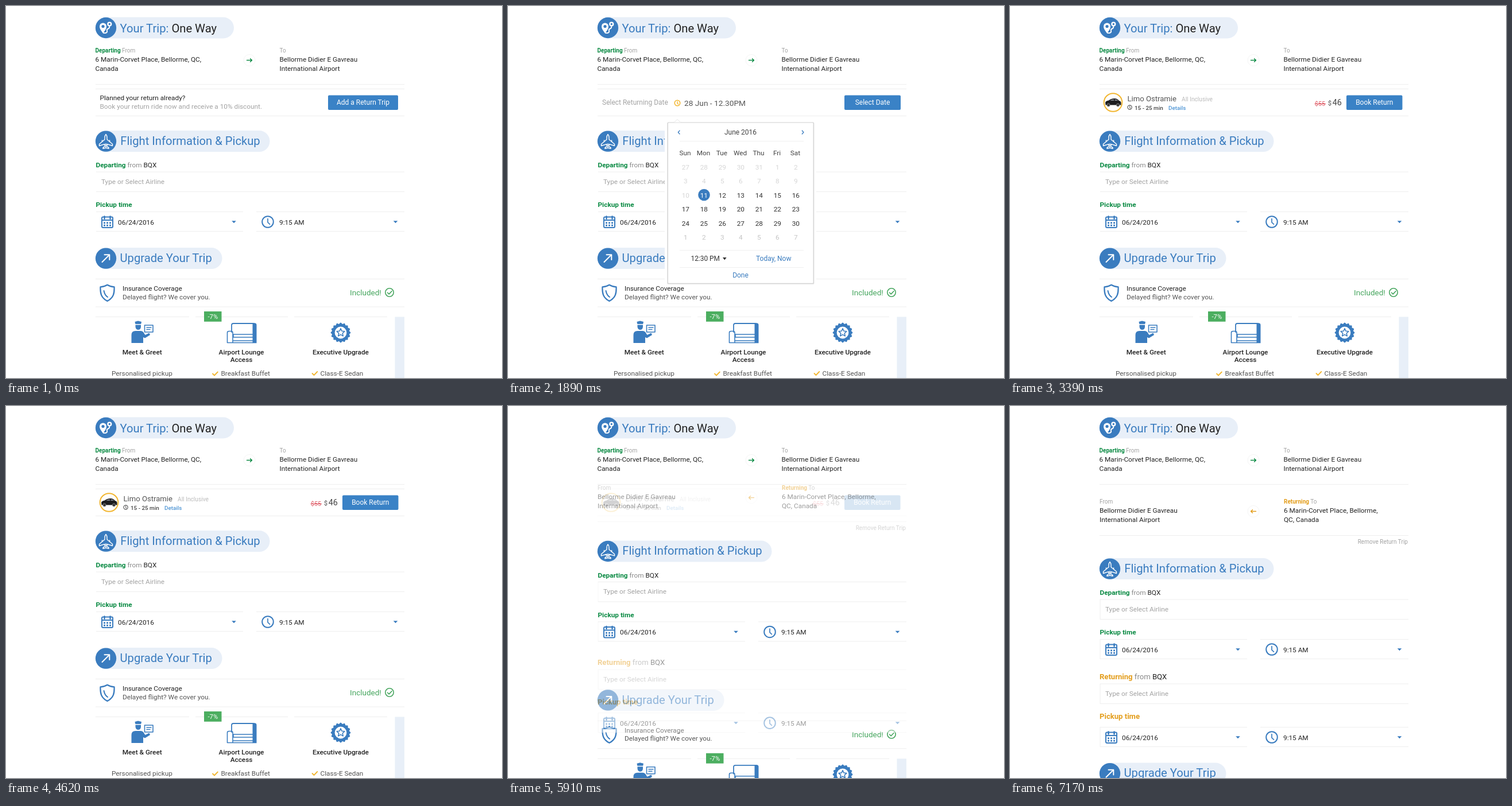
An HTML page for the animation above (7200 ms loop, 864x648 px).

```html
<!DOCTYPE html>
<html lang="en">
<head>
<meta charset="utf-8">
<title>Trip booking</title>
<style>
html, body { margin: 0; width: 100%; height: 100%; overflow: hidden; background: #fff; }
svg { display: block; width: 864px; height: 648px; }
text { font-family: Roboto, Arial, sans-serif; white-space: pre; }
</style>
</head>
<body>
<svg id="stage" viewBox="0 0 864 648" xmlns="http://www.w3.org/2000/svg"></svg>
<script>
const BLUE = '#3a7cbf', DARK = '#222', GRAY = '#a3a3a3', GREEN = '#0a8a43',
      ORANGE = '#e39d1b', GOLD = '#f2b630', RULE = '#eee', PILL = '#e8eff8';

const text = (x, y, s, fill = DARK, size = 11.8, more = '') =>
  `<text x="${x}" y="${y}" fill="${fill}" font-size="${size}" ${more}>${s}</text>`;
const mid = 'text-anchor="middle" ', bold = 'font-weight="700"', medium = 'font-weight="500"';
const span = (s, fill, more = '') => `<tspan fill="${fill}" ${more}>${s}</tspan>`;
const stroke = (d, color = BLUE, w = 2, fill = 'none') =>
  `<path d="${d}" fill="${fill}" stroke="${color}" stroke-width="${w}" stroke-linecap="round" stroke-linejoin="round"/>`;
const shape = (d, fill = BLUE) => `<path d="${d}" fill="${fill}"/>`;
const rule = (x1, x2, y, color = RULE) =>
  `<path d="M${x1} ${y}H${x2}" stroke="${color}" stroke-width="1"/>`;
const rect = (x, y, w, h, fill, r = 0, more = '') =>
  `<rect x="${x}" y="${y}" width="${w}" height="${h}" rx="${r}" fill="${fill}" ${more}/>`;
const disc = (x, y, r, fill, color = 'none', w = 0) =>
  `<circle cx="${x}" cy="${y}" r="${r}" fill="${fill}" stroke="${color}" stroke-width="${w}"/>`;
const group = (id, body) => `<g id="${id}">${body}</g>`;

const heading = (y, right, icon, title, x, base) =>
  rect(156, y - 18.5, right - 156, 37, PILL, 18.5) + disc(174, y, 18.2, BLUE) + icon +
  text(x, base, title, BLUE, 20.2);

const button = (x, w, s) =>
  rect(x, 155.5, w, 25.5, '#3a82c6', 2) + text(x + w / 2, 172.3, s, '#fff', 12, mid);

const clock = (x, y, r, color, w) =>
  disc(x, y, r, 'none', color, w) +
  stroke(`M${x} ${y - r * .55}V${y + r * .1}L${x + r * .35} ${y + r * .42}`, color, w * .85);

const drop = (x, y) => shape(`M${x - 3.8} ${y - 2}h7.6l-3.8 4z`);

function calendarIcon(x, y) {
  let s = rect(x - 9.5, y - 8.5, 19, 18.5, 'none', 2, `stroke="${BLUE}" stroke-width="2"`) +
    stroke(`M${x - 9.5} ${y - 3}h19`, BLUE, 2);
  for (const dx of [-5, 0, 5]) {
    if (dx) s += stroke(`M${x + dx} ${y - 9.5}v4`, BLUE, 2.6);
    for (const dy of [1.8, 6.2]) s += rect(x + dx - 1.4, y + dy - 1.4, 2.8, 2.8, BLUE);
  }
  return s;
}

const airline = y =>
  rule(157, 694, y) + rule(157, 694, y + 34.5) + text(166, y + 20.8, 'Type or Select Airline', GRAY, 11.8);

const pickup = y => {
  let s = '';
  for (const [a, b] of [[157, 413], [436, 694]]) s += rule(a, b, y) + rule(a, b, y + 34);
  return s + calendarIcon(176.5, y + 17.5) + text(195, y + 22, '06/24/2016') + drop(397, y + 17.7) +
    clock(456, y + 17.5, 9.8, BLUE, 2) + text(476, y + 22, '9:15 AM') + drop(678.5, y + 17.7);
};

const edges = (a, p) => stroke(`M157 ${a}v34.5M157 ${p}v34`, RULE, 1);

const arrow = (y, color, dir) =>
  disc(424, y, 10, 'none', '#f5f5f5', 1) +
  stroke(`M${424 - 4.5 * dir} ${y}h${9 * dir}m${-3 * dir} -2.8l${3 * dir} 2.8l${-3 * dir} 2.8`, color, 1.4);

const HOME = ['6 Marin-Corvet Place, Bellorme, QC,', 'Canada'];
const HOME_SHORT = ['6 Marin-Corvet Place, Bellorme,', 'QC, Canada'];
const AIRPORT = ['Bellorme Didier E Gavreau', 'International Airport'];
const place = (x, y, label, lines) =>
  text(x, y, label, GRAY, 10) + text(x, y + 16.2, lines[0]) + text(x, y + 32.2, lines[1]);

const pins =
  shape('M169 47.5C165 42 163 39 163 35.5a6 6 0 0 1 12 0C175 39 173 42 169 47.5z', '#fff') +
  disc(169, 35.5, 2.6, BLUE) + disc(180.3, 31.5, 2.9, 'none', '#fff', 2.4) +
  stroke('M180.3 35.5C181 41 174.5 38.5 176 43C177 47 173 47.5 170 47', '#fff', 1.8);

const plane = stroke('M174 223.5c1.6 1.5 2 3.5 2 6v3l9.5 8v3l-9.5-2.8v3.8l3 2.4v1.4l-5-1.2-5 1.2v-1.4l3-2.4v-3.8l-9.5 2.8v-3l9.500-8v-3c0-2.500.4-4.500 2-6z', '#fff', 1.4) +
  stroke('M180.500 234v2M167.500 234v2M174 240v6', '#fff', 1.5);

const upArrow = stroke('M167.5 446L180 433.5M171.5 433.2h8.8v8.8', '#fff', 2);

const trip = heading(38, 397, pins, 'Your Trip: ' + span('One Way', DARK), 198.5, 45.7) +
  place(155.5, 81, span('Departing', GREEN, bold) + ' From', HOME) + arrow(94.5, GREEN, 1) +
  place(476.5, 81, 'To', AIRPORT) + rule(156, 694, 136.5);

const offer = text(163.5, 163.8, 'Planned your return already?') +
  text(163.5, 179, 'Book your return ride now and receive a 10% discount.', GRAY) +
  button(561, 122, 'Add a Return Trip');

const dateRow = text(164, 172.4, 'Select Returning Date', GRAY, 12) + clock(295, 169, 4.7, GOLD, 1.6) +
  text(307, 174, '28 Jun - 12.30PM', '#555', 13.7) + button(586, 98, 'Select Date');

const car = shape('M166 168q1-3 6-3.5q4-3.5 10-3.5q5 0 8 4q3 .5 3.5 3v4.5h-27z', '#1c1c1e') +
  shape('M174 165q3-2.4 7-2.4v2.4zM182.5 162.6q4 0 6 2.4h-6z', '#777c82') +
  disc(171.5, 172.5, 2.6, '#333', '#999', .8) + disc(188, 172.5, 2.6, '#333', '#999', .8);

const ride = disc(179.5, 168, 15.8, '#fff', GOLD, 2) + car +
  text(204.5, 166.3, 'Limo Ostramie', '#555', 13.1) + text(299, 166.3, 'All Inclusive', '#bbb', 10.2) +
  clock(208.6, 176.5, 3.6, '#555', 1.2) + text(217, 180.7, '15 - 25 min', '#444', 9.9, medium) +
  text(276, 180.7, 'Details', '#4d94d4', 9.8, medium) +
  text(531, 174.3, '$55', '#e0606a', 10.7) + stroke('M531 170.5h18.5', '#d9414d', 1) +
  text(554, 173, '$', '#444', 10.7) + text(561.8, 173.2, '46', '#444', 14.3) + button(586, 97.5, 'Book Return');

const back = place(156, 170, 'From', AIRPORT) + arrow(183.5, ORANGE, -1) +
  place(477, 170, span('Returning', ORANGE, bold) + ' To', HOME_SHORT) +
  rule(156, 694, 225.5) + text(693, 240.3, 'Remove Return Trip', GRAY, 10.05, 'text-anchor="end"');

const from = (x, y, word, color, size) =>
  text(x, y, span(word, color, bold) + span(' from ', '#888') + 'BQX', DARK, size);

const flight = heading(235.6, 459.5, plane, 'Flight Information &amp; Pickup', 199.3, 241.8) +
  from(156.5, 281.2, 'Departing', GREEN, 11.8) + airline(289) +
  text(156.5, 350.3, 'Pickup time', GREEN, 11.8, bold) + pickup(358.5) + group('edges', edges(289, 358.5));

const returning = rect(156, 455, 538, 139, '#fff') + from(156, 476, 'Returning', ORANGE, 13.1) +
  airline(484) + text(156, 545.2, 'Pickup time', ORANGE, 13.1, bold) + pickup(559.5) + edges(484, 559.5);

const shield = stroke('M176.5 485.8c-4 2.5-8 3.5-12 3.5c-.5 11 1 19 12 24.7c11-5.7 12.5-13.7 12-24.7c-4 0-8-1-12-3.5z', BLUE, 2.3) +
  stroke('M170.5 496q1.5 8 6.5 11', BLUE, 2);

const greeter = shape('M224.5 550l5.5-1.5 6 1.5-.8 4h-9.9z') + shape('M225.5 555.5h9.5v3.5q-.5 5-4.7 5t-4.8-5z') +
  shape('M218.5 587v-14q0-7 7-7h9q4 0 6 4l2 3 7-3.5 1.5 3.5-9 5.5-3-1.5v10z') +
  stroke('M241.5 556h14.5v12h-14.5z', BLUE, 1.6, '#fff') + stroke('M245 560h8M245 563.5h6', BLUE, 1.4);

const sofa = stroke('M393 568v-12q0-3 3-3h35.5', BLUE, 1.8) + shape('M429.5 552.2h3.5q3.5 0 3.5 3.5v31.5h-7z') +
  stroke('M396 577v-5h34M385.5 569q0-2.5 3-2.5h3.5q3 0 3 2.5v8h35M385.5 569v17.5h9.5v-9.5M395 583h35M395 586.5h35', BLUE, 1.6);

function badge(cx, cy) {
  let rim = '', star = '';
  for (let i = 0; i < 96; i++) {
    const a = i * Math.PI / 48, r = 16.4 + 1.1 * Math.cos(a * 16);
    rim += `${i ? 'L' : 'M'}${cx + r * Math.cos(a)} ${cy + r * Math.sin(a)}`;
  }
  for (let i = 0; i < 10; i++) {
    const a = i * Math.PI / 5 - Math.PI / 2, r = i % 2 ? 3.4 : 7.2;
    star += `${i ? 'L' : 'M'}${cx + r * Math.cos(a)} ${cy + r * Math.sin(a)}`;
  }
  return shape(rim + 'z') + disc(cx, cy, 10.4, '#fff') + stroke(star + 'z', BLUE, 1.6);
}

const tick = (x, y) => stroke(`M${x} ${y}l3 3 5.8-6`, GOLD, 1.8);

const upgrade = heading(439.6, 376.5, upArrow, 'Upgrade Your Trip', 198.5, 445.8) +
  rule(156, 694, 475.5) + rule(156, 694, 524) + shield +
  text(203, 496.3, 'Insurance Coverage') + text(203, 510.5, 'Delayed flight? We cover you.', '#555') +
  text(599, 503.8, 'Included!', '#47a65f', 13.5) + disc(668, 499, 7.2, 'none', '#47a65f', 1.6) +
  stroke('M664.5 499.2l2.7 2.7 4.8-5.2', '#47a65f', 1.6) +
  rule(156, 319, 541.5) + rule(330, 491, 541.5) + rule(502, 664, 541.5) +
  rect(677.5, 541.5, 16.5, 200, PILL) + rect(345, 532, 30.5, 17.8, '#4cae60') +
  text(360.3, 545, '-7%', '#fff', 11.2, mid) + greeter + sofa + badge(583, 569) +
  text(237.2, 606.8, 'Meet &amp; Greet', DARK, 11.8, mid + medium) +
  text(410, 606.8, 'Airport Lounge', DARK, 11.8, mid + medium) +
  text(410, 620.3, 'Access', DARK, 11.8, mid + medium) +
  text(583, 606.8, 'Executive Upgrade', DARK, 11.8, mid + medium) +
  text(184, 643.8, 'Personalised pickup', '#555') + tick(360, 640.5) +
  text(374.5, 644.3, 'Breakfast Buffet', '#555') + tick(533.5, 640) + text(547.5, 643.8, 'Class-E Sedan', '#555');

function monthCard() {
  let s = rect(273, 197, 264, 292, '#fff') + rect(277, 202.5, 256.5, 282.5, '#ececec', 2) +
    rect(277.8, 202.5, 255, 281.5, '#d4d4d4', 1.5) + rect(279, 203.5, 252.5, 279.3, '#fff', 1) +
    stroke('M289.5 202.5l5.5-5 5.5 5', '#e8e8e8', 1, '#fff') +
    stroke('M299 217l-2.6 3 2.6 3M512.3 217l2.6 3-2.6 3', BLUE, 1.3) +
    text(405, 224.2, 'June 2016', '#444', 12, mid) +
    rule(299, 515, 235.5, '#f0f0f0') + rule(299, 515, 425.5, '#f0f0f0') + rule(299, 515, 455.5, '#f0f0f0');
  'Sun Mon Tue Wed Thu Fri Sat'.split(' ').forEach((d, i) => {
    s += text(308.5 + i * 32, 260.4, d, '#444', 11.8, mid);
  });
  s += disc(341.5, 329, 10.3, BLUE);
  for (let i = 0; i < 42; i++) {
    const n = i < 5 ? 27 + i : i < 35 ? i - 4 : i - 34;
    const fill = i === 15 ? '#fff' : i < 15 ? '#d6d6d6' : i > 34 ? '#c4c4c4' : '#333';
    s += text(309.3 + i % 7 * 32, 285 + Math.floor(i / 7) * 24.45, n, fill, 11.8, mid);
  }
  return s + text(318.5, 444.3, '12:30 PM', '#333', 11.9) + shape('M374 438h6.6l-3.3 4.4z', '#333') +
    text(432, 444.3, 'Today, Now', BLUE, 12) + text(405, 472.8, 'Done', BLUE, 12, mid);
}

const stage = document.getElementById('stage');
stage.innerHTML = rect(0, 0, 864, 648, '#fff') + trip +
  group('rules', rule(156, 694, 144.5) + rule(156, 694, 191.5)) +
  group('offer', offer) + group('ride', ride) + group('dates', dateRow) + group('back', back) +
  group('flight', flight) + group('upgrade', upgrade) + group('returning', returning) + group('month', monthCard());

const phase = (t, start, len) => Math.min(1, Math.max(0, (t - start) / len));
const easeOut = p => 1 - (1 - p) ** 3;
const easeSine = p => (1 - Math.cos(p * Math.PI)) / 2;

// cubic-bezier(.4, 0, .2, 1), solved by bisection
function easeSlide(p) {
  let a = 0, b = 1;
  for (let i = 0; i < 22; i++) {
    const s = (a + b) / 2, x = 1.2 * s * (1 - s) ** 2 + .6 * s * s * (1 - s) + s ** 3;
    if (x < p) a = s; else b = s;
  }
  return p >= 1 ? 1 : p <= 0 ? 0 : 3 * a * a - 2 * a ** 3;
}

function put(id, opacity, x = 0, y = 0) {
  const g = document.getElementById(id);
  g.style.display = opacity > .002 ? '' : 'none';
  g.setAttribute('opacity', opacity);
  g.setAttribute('transform', `translate(${x} ${y})`);
}

function draw(t) {
  const open = easeOut(phase(t, 885, 210)), swap = easeSine(phase(t, 2700, 690));
  const leave = phase(t, 5788, 152), show = easeOut(phase(t, 5788, 690)), slide = easeSlide(phase(t, 5791, 402));
  put('offer', 1 - open);
  put('dates', open * (1 - swap));
  put('month', open * (1 - swap), 0, swap > 0 ? 11 * swap : 10 * (1 - open));
  put('ride', swap * (1 - leave), 10 * (1 - swap));
  put('rules', 1 - leave);
  put('back', show, 0, -37.5 * (1 - slide));
  put('flight', 1, 0, 48 * slide);
  put('edges', show);
  put('upgrade', 1, 0, 200.5 * slide);
  put('returning', show, 0, -39 * (1 - slide));
}

const begin = performance.now();
function tickFrame() {
  draw((performance.now() - begin) % 7200);
  requestAnimationFrame(tickFrame);
}
draw(0);
requestAnimationFrame(tickFrame);
</script>
</body>
</html>
```
